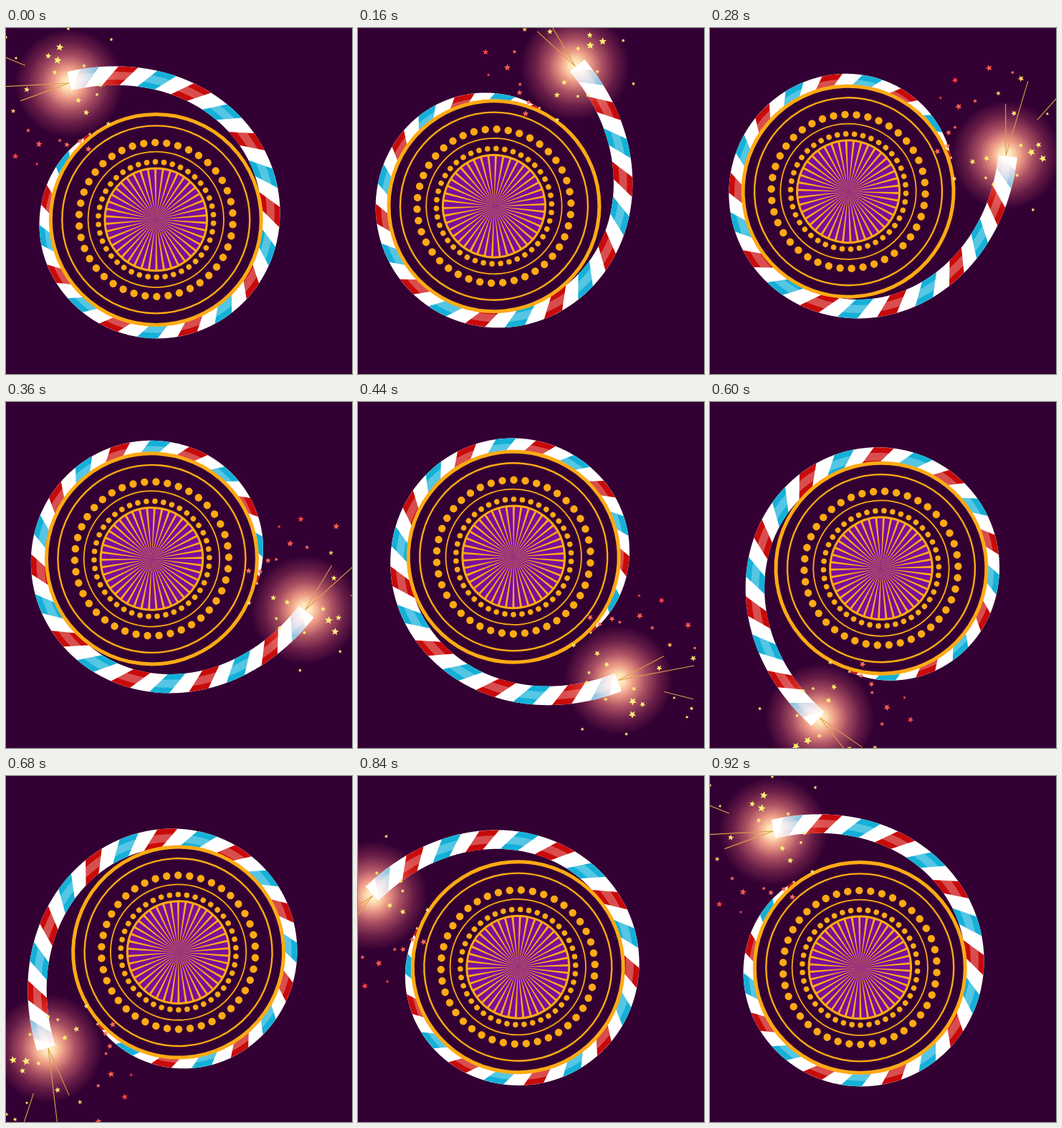
An HTML page with a canvas for the animation above (960 ms loop, 483 by 483 pixels).

```html
<!DOCTYPE html>
<html>
<head>
<meta charset="utf-8">
<title>Spinning firework</title>
<style>
html, body { margin: 0; height: 100%; overflow: hidden; background: #330033; }
canvas { display: block; }
</style>
</head>
<body>
<canvas id="stage" width="483" height="483"></canvas>
<script>
const ctx = document.getElementById('stage').getContext('2d');
const SIZE = 483, STEP = 40, STEPS = 24;
const TAU = Math.PI * 2, RAD = Math.PI / 180;
const BG = '#330033', GOLD = '#ffaa14', PURPLE = '#7a0f9c';
const pivot = [215, 242.1], hub = [209.3, 267.4], tip = [88, 77];
const HALF = 13.2; // half the tail's thickness

// x, y, radius
const stars = [
  [75, 27, 5.5], [147, 16, 2.7], [87, 1, 2.7], [59, 39, 4.3], [72, 45, 5.8], [68, 62, 3.6],
  [14, 42, 2.4], [29, 86, 4.2], [10, 116, 3.6], [109, 53, 3], [132, 80, 3.2], [127, 93, 2.8],
  [101, 101, 4.2], [112, 118, 4.4], [143, 134, 3.8], [117, 148, 2.6], [103, 158, 3.8],
  [75, 157, 2.9], [85, 163, 4.2], [115, 169, 4.6], [31, 143, 3.2], [46, 162, 4.9],
  [13, 179, 4.5], [43, 190, 2.5], [0, 13, 2.5], [-8, 24, 3], [-20, 93, 4.5],
  [-24, 107, 2.7], [-19, 140, 4.8]
];

// Spiral centre line, measured in degrees from the burning tip
function spiral(deg) {
  const droop = Math.max(0, deg - 270) / 83;
  const r = 151 + 77 * Math.exp(-0.0178 * deg) - 13 * droop * droop;
  const a = (deg - 122) * RAD;
  return { r, x: hub[0] + r * Math.cos(a), y: hub[1] + r * Math.sin(a) };
}

// One entry per pixel of length, with the outward normal
const tail = [];
for (let deg = 0; deg < 354;) {
  const p = spiral(deg), q = spiral(deg + 0.1);
  const dx = q.x - p.x, dy = q.y - p.y, len = Math.hypot(dx, dy);
  tail.push({ x: p.x, y: p.y, nx: dy / len, ny: -dx / len });
  deg += 0.1 / len;
}

function tailPoint(d, offset) {
  const p = tail[Math.max(0, Math.min(tail.length - 1, Math.round(d)))];
  return [p.x + p.nx * offset, p.y + p.ny * offset];
}

function fillPoly(points, color) {
  ctx.beginPath();
  points.forEach(p => ctx.lineTo(...p));
  ctx.fillStyle = color;
  ctx.fill();
}

function strokeTail(width, color) {
  ctx.beginPath();
  tail.forEach(p => ctx.lineTo(p.x, p.y));
  ctx.lineWidth = width;
  ctx.strokeStyle = color;
  ctx.stroke();
}

function drawTail() {
  strokeTail(HALF * 2, '#fff');
  for (let i = 0, d = 18; d < tail.length; i++, d += 51.75) {
    const edge = [-13, 0, 13];
    const outer = edge.map(e => tailPoint(d + 12 + e, HALF));
    const inner = edge.map(e => tailPoint(d - 12 + e, -HALF)).reverse();
    fillPoly([...outer, ...inner], i % 2 ? '#c80a0a' : '#14b0d8');
  }
  strokeTail(11, 'rgba(255,255,255,.28)');
}

function circle(x, y, r) {
  ctx.beginPath();
  ctx.arc(x, y, r, 0, TAU);
}

function ring(r, width, fill) {
  circle(0, 0, r);
  if (fill) {
    ctx.fillStyle = fill;
    ctx.fill();
  }
  ctx.lineWidth = width;
  ctx.strokeStyle = GOLD;
  ctx.stroke();
}

function drawDisc() {
  ctx.save();
  ctx.translate(...hub);
  ring(147, 5, BG);
  ring(131, 2.4);
  ring(94.7, 1.8);
  ring(71.3, 3, PURPLE);
  for (let i = 0; i < 42; i++) {
    ctx.save();
    ctx.rotate(i * TAU / 42 - 0.01);
    ctx.fillStyle = GOLD;
    circle(0, -107.5, 5.2);
    ctx.fill();
    circle(0, -80.5, 3.8);
    ctx.fill();
    fillPoly([[0, 0], [-1.5, -71], [1.5, -71]], GOLD);
    ctx.restore();
  }
  ctx.restore();
}

function drawGlow() {
  const [x, y] = tip;
  const g = ctx.createRadialGradient(x, y, 0, x, y, 76);
  g.addColorStop(0, '#fff6d0');
  g.addColorStop(0.12, '#ffe0a0');
  g.addColorStop(0.28, '#e89a68');
  g.addColorStop(0.5, '#94503c');
  g.addColorStop(0.75, '#401c18');
  g.addColorStop(1, '#000');
  ctx.globalCompositeOperation = 'screen';
  circle(x, y, 76);
  ctx.fillStyle = g;
  ctx.fill();
  ctx.globalCompositeOperation = 'source-over';
}

function drawRay(deg, from, to) {
  const c = Math.cos(deg * RAD), s = Math.sin(deg * RAD);
  ctx.beginPath();
  ctx.moveTo(tip[0] + c * from, tip[1] + s * from);
  ctx.lineTo(tip[0] + c * to, tip[1] + s * to);
  ctx.lineWidth = 1.1;
  ctx.strokeStyle = '#dca043';
  ctx.stroke();
}

// Sparks cool from yellow to red towards the lower left
function drawStar([x, y, r]) {
  const heat = y - 0.35 * x, cool = Math.max(0, heat - 70);
  const hue = heat < 115 ? 54 - cool * 0.45 : 10 - (heat - 115) * 0.2;
  const points = [];
  for (let i = 0; i < 10; i++) {
    const a = i * TAU / 10 - 1.4, k = i % 2 ? r * 0.45 : r;
    points.push([x + k * Math.cos(a), y + k * Math.sin(a)]);
  }
  fillPoly(points, `hsl(${hue}, 95%, ${72 - cool * 0.1}%)`);
}

function draw(now) {
  const step = Math.floor(now / STEP) % STEPS;
  ctx.fillStyle = BG;
  ctx.fillRect(0, 0, SIZE, SIZE);
  ctx.save();
  ctx.translate(...pivot);
  ctx.rotate(step / (STEPS - 1) * TAU);
  ctx.translate(-pivot[0], -pivot[1]);
  drawTail();
  drawDisc();
  drawGlow();
  drawRay(177, 0, 108);
  drawRay(160, 0, 72);
  drawRay(202, 66, 108);
  stars.forEach(drawStar);
  ctx.restore();
}

let start;
function tick(now) {
  start ??= now;
  draw(now - start);
  requestAnimationFrame(tick);
}
draw(0);
requestAnimationFrame(tick);
</script>
</body>
</html>
```
